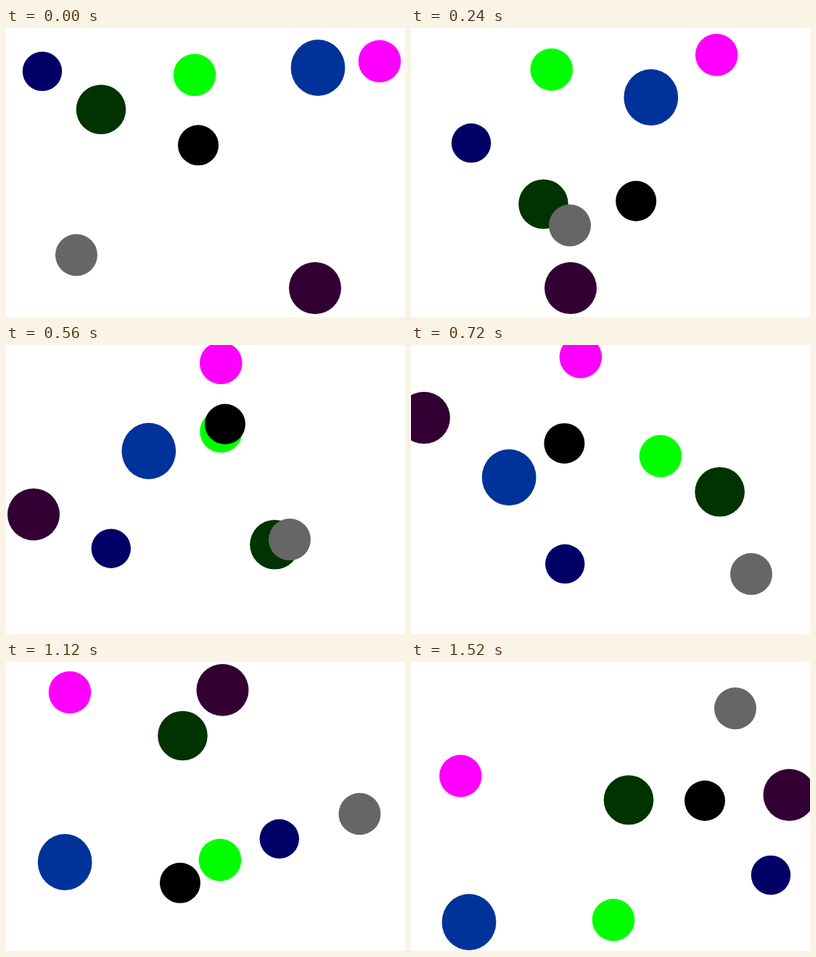
An HTML page with a canvas for the animation above (1.6 s loop, 550x400 px).

```html
<!DOCTYPE html>
<html lang="en">
<head>
<meta charset="utf-8">
<title>Drifting balls</title>
<style>
  html, body { margin: 0; width: 100%; height: 100%; overflow: hidden; background: #fff; }
  canvas { display: block; }
</style>
</head>
<body>
<canvas width="550" height="400"></canvas>
<script>
const ctx = document.querySelector('canvas').getContext('2d');
const STEP = 80, STEPS = 20;
const times = [0, 3, 7, 11, 14, 16, 19];

// Back to front: colour, radii and the waypoints passed at `times`.
const balls = [
  ['#330033', 36, 36, '426,360 220,360 38,234.5 93.5,24.7 298.5,38.7 435.3,47.8 521.5,184'],
  ['#00ff00', 29.3, 29.3, '260,65 193.8,57.5 296.5,119.7 350.5,197.5 295,274 244.3,313.2 279,357'],
  ['#003300', 34.3, 34.3, '131,112.8 182.5,243.8 370.5,276.3 386,117.4 243.5,102 197.8,183 300,191'],
  ['#000066', 27.2, 27.2, '50,60 83,159.3 144.8,281.7 283.8,297 376.8,244.8 436.5,218.3 496,295'],
  ['#003399', 37.4, 39, '430,55 330.8,96 196.8,146.8 76.3,224.3 81.2,277 137,302.7 80,360'],
  ['#ff00ff', 29.3, 29.3, '515,46 421.2,37.2 296.3,25 171.3,12.8 88,42 120.8,86.8 68.3,157.7'],
  ['#000000', 28, 28, '265,162.3 310.2,239.5 302,109.5 164.5,202.3 240,305.8 335.5,305.8 405,192'],
  ['#666666', 29, 29, '97,314.2 219,273.3 391,269.3 517.5,321.6 487.5,210.3 431.2,145.4 447,64.3']
].map(([color, rx, ry, route]) => {
  const points = route.split(' ').map(p => p.split(',').map(Number));
  return { color, rx, ry, points, tangents: findTangents(points) };
});

// Every ball keeps an even pace; nearly straight stretches set the heading.
function findTangents(points) {
  const slopes = points.slice(1).map((p, i) =>
    p.map((v, k) => (v - points[i][k]) / (times[i + 1] - times[i])));
  const speeds = slopes.map(s => Math.hypot(...s));
  const pace = 1.02 * Math.max(...speeds);
  const weights = speeds.map(s => 1 / (1.04 * pace - s));
  return points.map((_, i) => {
    const sum = [0, 0];
    for (const j of [i - 1, i])
      if (slopes[j]) slopes[j].forEach((v, k) => sum[k] += v * weights[j]);
    const scale = pace / Math.hypot(...sum);
    return sum.map(v => v * scale);
  });
}

function position({ points, tangents }, t) {
  let i = 0;
  while (times[i + 1] < t) i++;
  const span = times[i + 1] - times[i];
  const s = (t - times[i]) / span, r = 1 - s;
  return [0, 1].map(k =>
    points[i][k] * r * r * (1 + 2 * s) + points[i + 1][k] * s * s * (1 + 2 * r) +
    span * s * r * (tangents[i][k] * r - tangents[i + 1][k] * s));
}

function draw(now) {
  const t = Math.floor(now / STEP) % STEPS;
  ctx.fillStyle = '#fff';
  ctx.fillRect(0, 0, 550, 400);
  for (const ball of balls) {
    const [x, y] = position(ball, t);
    ctx.fillStyle = ball.color;
    ctx.beginPath();
    ctx.ellipse(x, y, ball.rx, ball.ry, 0, 0, 2 * Math.PI);
    ctx.fill();
  }
}

let start;
function tick(now) {
  start ??= now;
  draw(now - start);
  requestAnimationFrame(tick);
}
draw(0);
requestAnimationFrame(tick);
</script>
</body>
</html>
```
